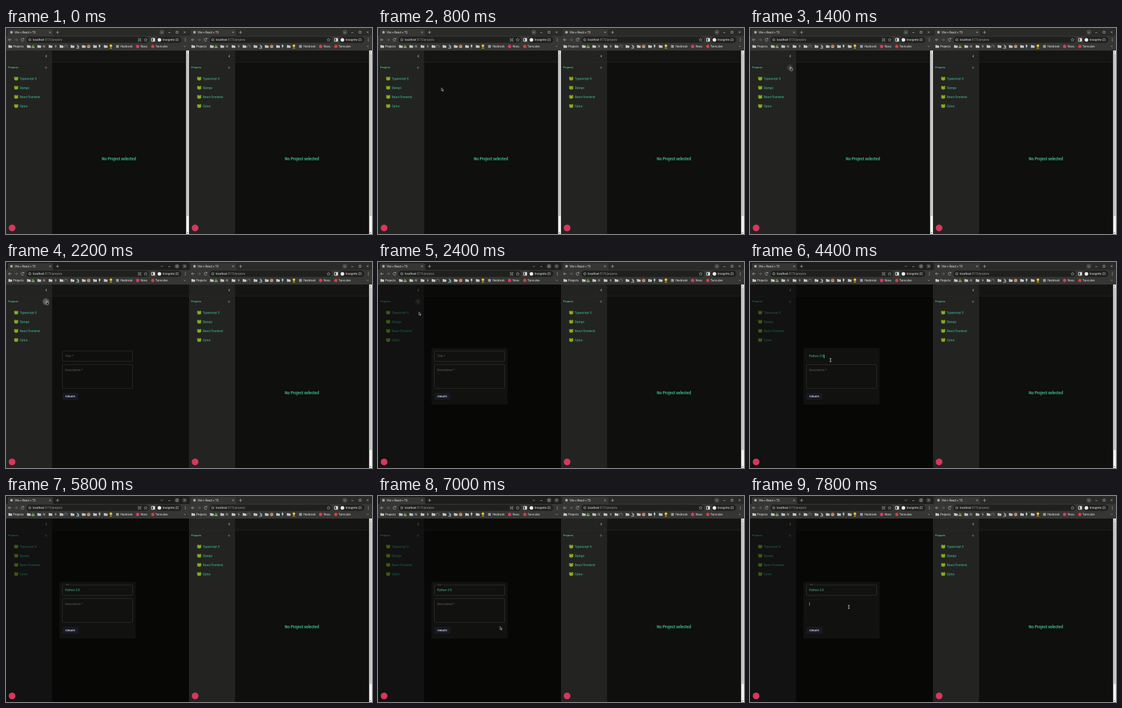
Write an HTML page that moves like this. It is 600 px wide and 338 px high and loops after 8 s.

```html
<!DOCTYPE html>
<html lang="en">
<head>
<meta charset="utf-8">
<title>Projects</title>
<style>
html, body { margin: 0; width: 100%; height: 100%; overflow: hidden; background: #0e0e0c; }
svg { position: absolute; left: 0; top: 0; width: 600px; height: 338px; }
text, .typed { font-family: Roboto, "Open Sans", sans-serif; }
.ui { font-size: 4.7px; fill: #e4e4e4; }
.item { font-size: 5.05px; fill: #3cc596; }
.label { font-size: 5.05px; fill: #5b5b58; }
.small { font-size: 3.8px; }
.line { fill: none; stroke: #b9b9b9; stroke-width: .7; }
.box { fill: none; stroke: #383835; stroke-width: .7; }
.dark { stroke: #191a18; }

/* Every state change is a hard cut on one 8 s clock */
.idle, .ready, .hover, .press, .open, .dim, .t-empty, .t-focus, .t-done,
.d-empty, .d-focus, .arrow, .hand, .beam, .pointer, .caret, .typed::before {
  animation: 8s step-end infinite;
}
.idle { animation-name: idle; }
.ready { animation-name: ready; }
.hover { animation-name: hover; }
.press { animation-name: press; }
.open { animation-name: open; }
.dim { animation-name: dim; }
.t-empty { animation-name: t-empty; }
.t-focus { animation-name: t-focus; }
.t-done { animation-name: t-done; }
.d-empty { animation-name: d-empty; }
.d-focus { animation-name: d-focus; }
.arrow { animation-name: arrow; }
.hand { animation-name: hand; }
.beam { animation-name: beam; }
.pointer { animation-name: move; }
@keyframes idle { 0% { opacity: 1 } 22.5%, 100% { opacity: 0 } }
@keyframes ready { 0% { opacity: 1 } 27.5%, 100% { opacity: 0 } }
@keyframes hover { 0% { opacity: 0 } 15% { opacity: 1 } 32.5%, 100% { opacity: 0 } }
@keyframes press { 0% { opacity: 0 } 22.5% { opacity: 1 } 30%, 100% { opacity: 0 } }
@keyframes open { 0% { opacity: 0 } 27.5%, 100% { opacity: 1 } }
@keyframes dim { 0% { opacity: 0 } 30%, 100% { opacity: 1 } }
@keyframes t-empty { 0% { opacity: 1 } 37.5%, 100% { opacity: 0 } }
@keyframes t-focus { 0% { opacity: 0 } 37.5% { opacity: 1 } 72.5%, 100% { opacity: 0 } }
@keyframes t-done { 0% { opacity: 0 } 72.5%, 100% { opacity: 1 } }
@keyframes d-empty { 0% { opacity: 1 } 95%, 100% { opacity: 0 } }
@keyframes d-focus { 0% { opacity: 0 } 95%, 100% { opacity: 1 } }
@keyframes arrow {
  0% { opacity: 0 } 5% { opacity: 1 } 15% { opacity: 0 } 30% { opacity: 1 }
  35% { opacity: 0 } 87.5% { opacity: 1 } 90%, 100% { opacity: 0 }
}
@keyframes hand { 0% { opacity: 0 } 15% { opacity: 1 } 30%, 100% { opacity: 0 } }
@keyframes beam {
  0% { opacity: 0 } 35% { opacity: 1 } 60% { opacity: 0 } 90%, 100% { opacity: 1 }
}
@keyframes move {
  0% { transform: translate(150px, 140px) }
  7.5% { transform: translate(128px, 122px) }
  10% { transform: translate(104px, 98px) }
  12.5% { transform: translate(84px, 78px) }
  15% { transform: translate(69px, 67px) }
  17.5% { transform: translate(67px, 64px) }
  30% { transform: translate(67px, 82px) }
  32.5% { transform: translate(92px, 120px) }
  35% { transform: translate(120px, 150px) }
  37.5% { transform: translate(130px, 158px) }
  55% { transform: translate(132px, 161px) }
  57.5% { transform: translate(136px, 168px) }
  87.5% { transform: translate(200px, 214px) }
  90% { transform: translate(186px, 198px) }
  92.5% { transform: translate(172px, 187px) }
  95%, 100% { transform: translate(162px, 182px) }
}
.typed {
  position: absolute; left: 97px; top: 151px; height: 7px;
  font-size: 5.05px; line-height: 7px; color: #3cc596; white-space: pre;
}
.typed::before { content: ""; animation-name: type; }
@keyframes type {
  0% { content: "" }
  40% { content: "P" }
  42.5% { content: "Pyt" }
  45% { content: "Pyth" }
  47.5% { content: "Python" }
  50% { content: "Python " }
  52.5% { content: "Python 3." }
  55%, 100% { content: "Python 3.5" }
}
.caret {
  display: inline-block; width: .8px; height: 6px; vertical-align: top;
  margin-top: .5px; background: #3cc596; animation-name: blink;
}
@keyframes blink { 0% { opacity: 0 } 37.5% { opacity: 1 } 67.5%, 100% { opacity: 0 } }
</style>
</head>
<body>
<svg viewBox="0 0 600 338">
  <defs>
    <path id="folder" d="M-3-2.2h2.2l.8.8h3v3.8h-6z" fill="#c4c4c4"/>
    <g id="frog">
      <circle cx="-1.8" cy="-1.7" r="1.4" fill="#a8cf2c"/>
      <circle cx="1.8" cy="-1.7" r="1.4" fill="#a8cf2c"/>
      <ellipse cy=".5" rx="3.2" ry="2.5" fill="#93bd23"/>
      <circle cx="-1.7" cy="-1.6" r=".6" fill="#27300d"/>
      <circle cx="1.7" cy="-1.6" r=".6" fill="#27300d"/>
      <path d="M-2 .8Q0 2.2 2 .8" fill="none" stroke="#45590f" stroke-width=".5"/>
    </g>

    <g id="chrome">
      <path d="M1 13.5Q3 13 3 10V4Q3 2 5 2H75Q77 2 77 4V10Q77 13 79 13.5z" fill="#363634"/>
      <rect y="13" width="300" height="24" fill="#363634"/>
      <circle cx="9" cy="7" r="2.2" fill="#aaa79a"/>
      <text class="ui" style="font-size:4.55px" x="14" y="8.9">Vite + React + TS</text>
      <path class="line" d="M71 5.8l2.6 2.6m0-2.6l-2.6 2.6M84.500 4.600v5m-2.500-2.500h5"/>
      <path class="line" d="M253.800 6.300l1.700 1.600l1.700-1.600M266 7.600h3.500M278.800 5.300h3.200v3.200h-3.200zM291.300 5.400l3 3m0-3l-3 3"/>
      <path class="line" d="M9 19.300H4m2.300-2.300L4 19.300l2.300 2.300"/>
      <path class="line" style="stroke:#777" d="M14 19.300h5m-2.300-2.300l2.300 2.300l-2.300 2.300"/>
      <path class="line" d="M29 18a2.300 2.300 0 1 0 .3 2.200M29.300 16.500v1.800h-1.800"/>
      <rect x="33.500" y="14.200" width="201" height="10.400" rx="5.200" fill="#20201f"/>
      <circle class="line" cx="39" cy="19.300" r="1.900"/>
      <path class="line" d="M39 19v1.200"/>
      <text class="ui" style="font-size:4.55px" x="44" y="20.900">localhost<tspan fill="#979797">:5173/projects</tspan></text>
      <path class="line" style="stroke-width:.5" d="M229 16.600l.8 1.900 2 .1-1.600 1.300.6 2-1.800-1.100-1.800 1.100.6-2-1.600-1.300 2-.1z"/>
      <path d="M238.700 17h5v4.800h-5z" fill="none" stroke="#eee" stroke-width=".9"/>
      <path d="M241.200 17h2.500v4.800h-2.500z" fill="#eee"/>
      <rect x="246.500" y="14.200" width="41" height="10.400" rx="5.200" fill="#20201f"/>
      <circle cx="251.500" cy="19.400" r="3" fill="#e8e8e8"/>
      <text class="ui" x="256.800" y="21">Incognito (2)</text>
      <path d="M294 17.200v.1m0 2v.1m0 2v.1" stroke="#ddd" stroke-width="1" stroke-linecap="round"/>

      <use href="#folder" x="7" y="30.200"/>
      <text class="ui" x="11.800" y="32">Projects</text>
      <use href="#folder" x="37.500" y="30.200"/>
      <path d="M41.500 33l1.500-4 1.500 1.500 1.500-2 1.200 4.500z" fill="#55ad46"/>
      <circle cx="44" cy="28.800" r="1.100" fill="#d9574a"/>
      <use href="#folder" x="54.500" y="30.200"/>
      <text class="ui" x="60" y="32">AI</text>
      <use href="#folder" x="73" y="30.200"/>
      <path d="M82 27l-2.200 3.500h1.700l-.8 3 2.500-3.900h-1.700z" fill="#aaa"/>
      <use href="#folder" x="91" y="30.200"/>
      <path d="M95.800 32.500v-2a2.200 2.200 0 0 1 4.400 0v2" fill="none" stroke="#657078" stroke-width="1.100"/>
      <use href="#folder" x="109" y="30.200"/>
      <path d="M116.500 27.500l1.700 3.500M115 33h4.800M118.300 29q2 2-.3 4" fill="none" stroke="#9fc4d8" stroke-width="1.100"/>
      <use href="#folder" x="127.500" y="30.200"/>
      <circle cx="135.500" cy="30.300" r="2.800" fill="#c98d58"/>
      <circle cx="134.600" cy="29.300" r=".7" fill="#d94848"/>
      <circle cx="136.700" cy="29.800" r=".7" fill="#5591d6"/>
      <use href="#folder" x="146" y="30.200"/>
      <rect x="152" y="27.200" width="2.600" height="4.300" rx="1.300" fill="#b0c8d0"/>
      <path d="M153.300 31.500v2" stroke="#6fa5b4" stroke-width="1"/>
      <use href="#folder" x="163.500" y="30.200"/>
      <circle cx="172" cy="29.200" r="2.100" fill="#f0c52f"/>
      <path d="M169.700 33.500q2.300-3.500 4.600 0z" fill="#e0a829"/>
      <rect x="180.500" y="28" width="4.500" height="4.500" fill="#8f9cac"/>
      <text class="ui" x="187.500" y="32">Hexbrook</text>
      <circle cx="215.800" cy="30.200" r="2.700" fill="#dc3b5d"/>
      <text class="ui" x="220.800" y="32">Novu</text>
      <circle cx="240.700" cy="30.200" r="2.600" fill="#d8413a"/>
      <text class="ui" x="245" y="32">Tarvo.dev</text>
      <path class="line" d="M291.800 29.500l1.300 1.400 1.300-1.400"/>
    </g>
    <g id="idle-mark">
      <circle cx="255.500" cy="7" r="4" fill="#464644"/>
      <path class="line" d="M253.800 6.300l1.700 1.600l1.700-1.600"/>
    </g>

    <g id="app">
      <rect y="37" width="300" height="301" fill="#0f0f0d"/>
      <rect x="75" y="37" width="225" height="19" fill="#141412"/>
      <rect y="37" width="75" height="301" fill="#232422"/>
      <path d="M75.200 37v301M0 56.200h300" stroke="#2c2d2b" stroke-width=".6"/>
      <path d="M66.800 44.500l-1.700 1.700 1.700 1.700" fill="none" stroke="#eee" stroke-width=".9"/>
      <text x="3.800" y="66.400" font-size="4.4" font-weight="700" fill="#3cc596">Projects</text>
      <path d="M65.500 62.800v4.400m-2.200-2.200h4.400" stroke="#777875" stroke-width=".7"/>
      <use href="#frog" x="16.700" y="83"/>
      <use href="#frog" x="16.700" y="98"/>
      <use href="#frog" x="16.700" y="113"/>
      <use href="#frog" x="16.700" y="128"/>
      <text class="item" x="22.500" y="84.700">Typescript 5</text>
      <text class="item" x="22.500" y="99.700">Django</text>
      <text class="item" x="22.500" y="114.700">React frontend</text>
      <text class="item" x="22.500" y="129.700">Cplus</text>
    </g>
    <g id="blank">
      <text x="185" y="217" font-size="6.4" font-weight="500" text-anchor="middle" fill="#42cf9f">No Project selected</text>
      <rect x="295.300" y="37" width="4.700" height="301" fill="#f2f2f2"/>
      <rect x="295.800" y="41.500" width="3.700" height="267" fill="#c3c3c3"/>
      <path d="M296.300 40l1.300-1.500 1.300 1.500zM296.300 335.200l1.300 1.500 1.300-1.500z" fill="#555"/>
    </g>
    <circle id="badge" cx="10" cy="328" r="5.500" fill="#d9365c"/>
  </defs>

  <g transform="translate(300)">
    <rect width="300" height="14" fill="#2a2a28"/>
    <use href="#chrome"/>
    <use href="#idle-mark"/>
    <use href="#app"/>
    <use href="#blank"/>
    <use href="#badge"/>
  </g>

  <rect width="300" height="14" fill="#1d1d1b"/>
  <circle cx="280.400" cy="7" r="4" fill="#393937"/>
  <circle cx="292.800" cy="7" r="4" fill="#393937"/>
  <rect class="idle" width="300" height="14" fill="#2a2a28"/>
  <use href="#chrome"/>
  <use class="idle" href="#idle-mark"/>
  <path class="line" d="M217.800 18.300h2.400v2.400h-2.400zM217.800 18.300h-.7a.7.700 0 1 1 .7-.7zM220.200 18.300v-.7a.7.700 0 1 1 .7.700zM220.200 20.700h.7a.7.700 0 1 1-.7.700zM217.800 20.700v.7a.7.700 0 1 1-.7-.7z" style="stroke-width:.5"/>
  <use href="#app"/>
  <use class="ready" href="#blank"/>
  <g class="hover">
    <circle cx="65.500" cy="65" r="5.300" fill="#353634"/>
    <circle class="press" cx="65.500" cy="65" r="5.500" fill="#555653"/>
    <path d="M65.500 62.800v4.400m-2.200-2.200h4.400" stroke="#8a8b88" stroke-width=".7"/>
  </g>

  <g class="dim">
    <rect y="37" width="300" height="301" opacity=".5"/>
    <rect x="87.500" y="141" width="125" height="93" rx="1" fill="#11110f"/>
  </g>
  <use href="#badge"/>

  <g class="open">
    <g class="t-empty">
      <rect class="box" x="92.500" y="146" width="115" height="17" rx="1"/>
      <text class="label" x="97" y="156">Title *</text>
    </g>
    <rect class="box dark t-focus" x="92.500" y="146" width="115" height="17" rx="1"/>
    <g class="t-done">
      <rect class="box" x="92.500" y="146" width="115" height="17" rx="1"/>
      <path d="M95.800 146h11.500" stroke="#11110f" stroke-width="1.500"/>
      <text class="label small" x="97" y="147">Title *</text>
    </g>
    <g class="d-empty">
      <rect class="box" x="92.500" y="168.300" width="115" height="39" rx="1"/>
      <text class="label" x="97" y="178.600">Description *</text>
    </g>
    <g class="d-focus">
      <rect class="box dark" x="92.500" y="168.300" width="115" height="39" rx="1"/>
      <path d="M95.800 168.300h24" stroke="#11110f" stroke-width="1.500"/>
      <text class="label small" style="fill:#232421" x="97" y="170.800">Description *</text>
      <rect x="97" y="174" width=".8" height="6" fill="#3cc596"/>
    </g>
    <rect x="92.500" y="214.800" width="26" height="11.200" rx="1.200" fill="#171a25"/>
    <text x="105.500" y="221.900" font-size="4.4" font-weight="500" letter-spacing=".08" text-anchor="middle" fill="#f0f0f0">CREATE</text>
  </g>
</svg>

<div class="typed"><i class="caret"></i></div>

<svg viewBox="0 0 600 338">
  <g class="pointer">
    <path class="arrow" d="M0 0v5l1.200-1 .9 2 .9-.4-.9-1.900h1.600z" fill="#111" stroke="#eee" stroke-width=".5"/>
    <path class="hand" d="M-.5 0q.6-.7 1.100 0v2.200l2.200.6v2.200l-.7 1.200h-2.400l-1.700-2.500.8-.3.700.7z" fill="#222" stroke="#eee" stroke-width=".5"/>
    <path class="beam" d="M-1.300-2.800q1.300 0 1.300.8 0-.8 1.300-.8M0-2v4M-1.300 2.800q1.300 0 1.300-.8 0 .8 1.300.8" fill="none" stroke="#e8e8e8" stroke-width=".8"/>
  </g>
</svg>
</body>
</html>
```
